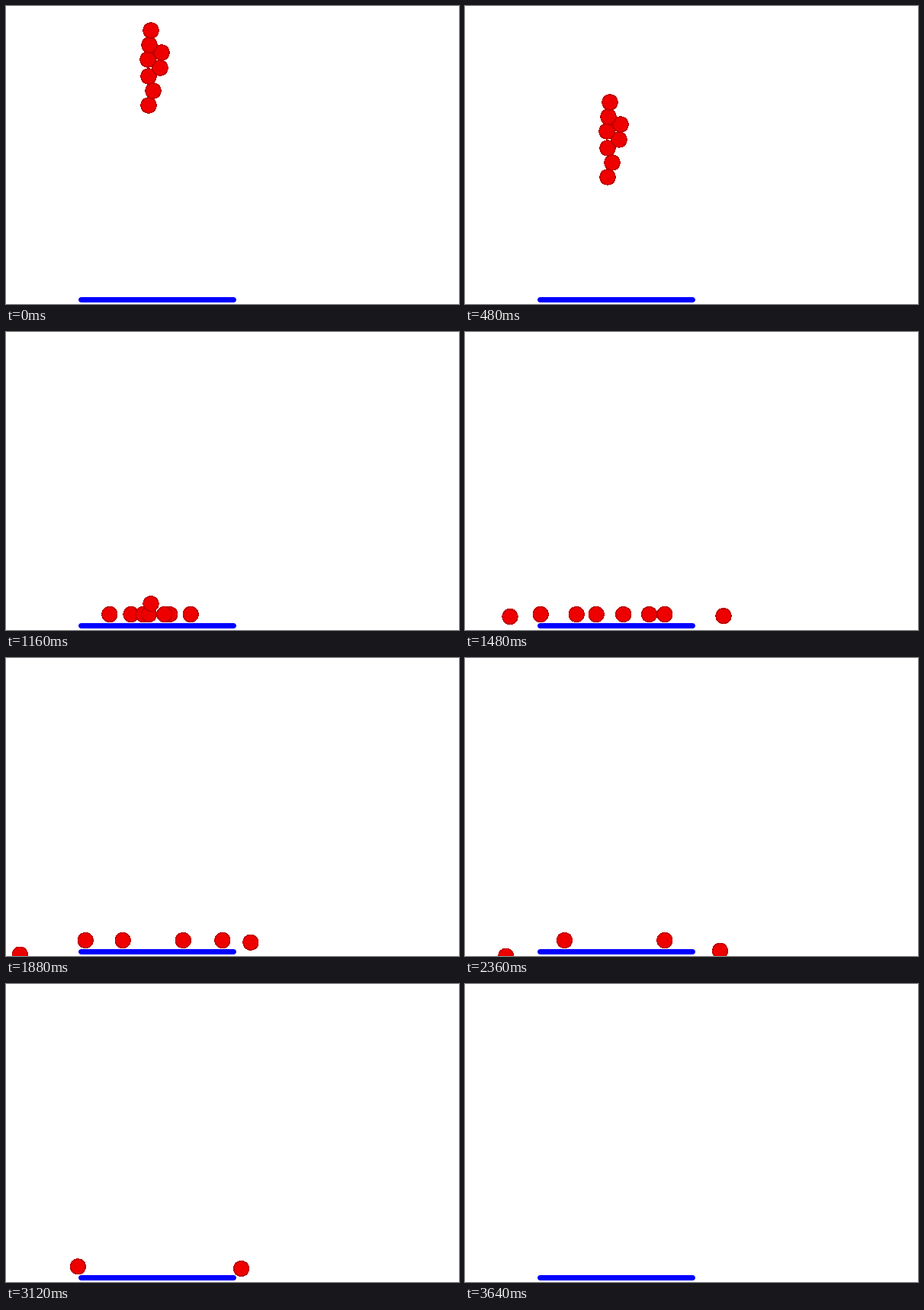
A matplotlib script that plays this animation: 594x390 px, repeating every 4120 ms.

```python
import numpy as np
import matplotlib.pyplot as plt
from matplotlib.animation import FuncAnimation
from matplotlib.patches import Circle

W, H, DPI = 594, 390, 100
FRAMES, STEP_MS = 103, 40
RADIUS = 9.8
FLOOR = 369.5                    # centre height of a ball resting on the bar
LEFT, RIGHT = 97, 299            # where a ball rolls off the bar
SPEED, GRAVITY = 5.48, 0.392     # pixels per step, pixels per step squared
PX = 72 / DPI

# start x, start y, rolling speed; from the lowest ball to the highest
BALLS = [
    (187, 130, -9.6), (193, 111, 12.1), (187, 92, -8.1), (202, 81, 5.9),
    (186, 70, -4.2), (204, 61, 4.22), (188, 51, -1.9), (190, 32, 2.46),
]


def drop(t, speed=0):
    return speed * t + GRAVITY * t * t / 2


def position(n, x0, y0, roll):
    """Fall onto the bar, roll along it, then drop off its end."""
    land = (np.sqrt(SPEED**2 + 2 * GRAVITY * (FLOOR - y0)) - SPEED) / GRAVITY
    if n < land:
        return x0, y0 + drop(n, SPEED)
    edge = LEFT if roll < 0 else RIGHT
    leave = land + (edge - x0) / roll
    return x0 + roll * (n - land), FLOOR + drop(max(0, n - leave))


fig = plt.figure(figsize=(W / DPI, H / DPI), dpi=DPI, facecolor="white")
ax = fig.add_axes([0, 0, 1, 1])
ax.set_xlim(0, W)
ax.set_ylim(H, 0)
ax.axis("off")

ax.plot([97.5, 297.5], [383.5, 383.5], color="#0000ff", lw=7 * PX,
        solid_capstyle="round", zorder=1)
discs = [ax.add_patch(Circle((0, 0), RADIUS, fc="#ee0000", ec="#c00000",
                             lw=0.5 * PX, antialiased=False, zorder=2))
         for _ in BALLS]


def update(n):
    for disc, ball in zip(discs, BALLS):
        disc.center = position(n, *ball)
    return discs


anim = FuncAnimation(fig, update, frames=FRAMES, interval=STEP_MS,
                     repeat=True, repeat_delay=0)
plt.show()
```
